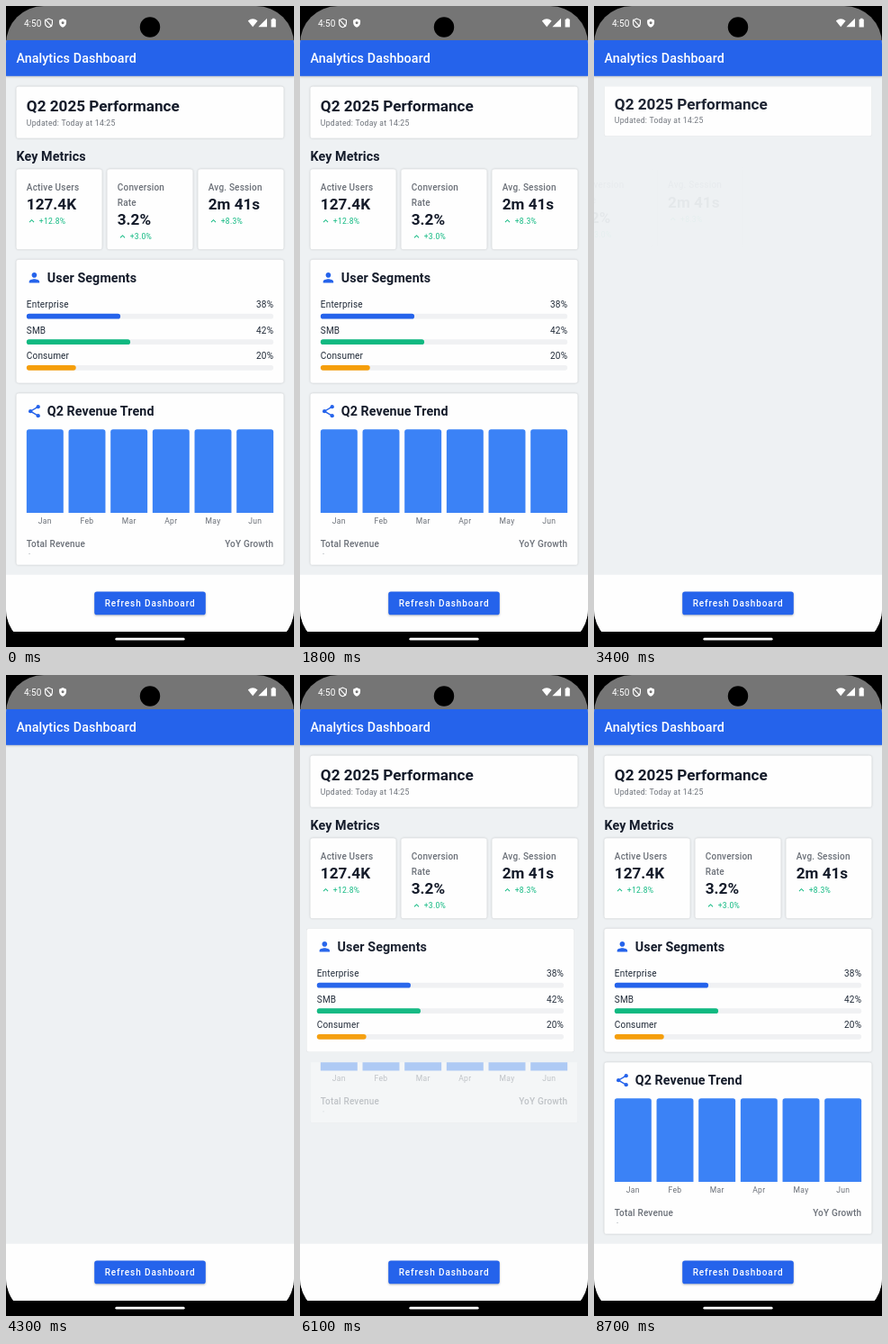
Write an HTML page that moves like this. It is 320 px wide and 712 px high and loops after 8.8 s.

```html
<!DOCTYPE html>
<html lang="en">
<head>
<meta charset="utf-8">
<title>Analytics Dashboard</title>
<style>
  html, body { margin: 0; width: 100%; height: 100%; overflow: hidden; background: #000; }
  svg { display: block; width: 320px; height: 712px; }
  text { font-family: Roboto, sans-serif; white-space: pre; }
  .card { fill: #fefefe; filter: drop-shadow(0 .8px .8px rgba(0, 0, 0, .2)); }
</style>
</head>
<body>
<svg id="stage" viewBox="0 0 320 712" xmlns="http://www.w3.org/2000/svg"></svg>
<script>
const LOOP = 8800;
const DP = 5 / 7;
const LEFT = 16 * DP, RIGHT = 320 - LEFT;
const IN_L = 32 * DP, IN_R = 320 - IN_L, IN_W = IN_R - IN_L;
const BLUE = '#2563eb', GREEN = '#10b981', ORANGE = '#f59e0b';
const INK = '#141b2a', GRAY = '#6b7078';

// Type styles: size (sp), weight, letter spacing (sp), colour
const TYPE = {
  h5: [24, 700, 0, INK],
  h6: [20, 700, 0.15, INK],
  bar: [20, 500, 0.15, '#fff'],
  label: [14, 500, 0.25, GRAY],
  body: [14, 400, 0.25, '#1f2937'],
  caption: [12, 400, 0.4, GRAY],
  trend: [12, 400, 0.4, GREEN],
  button: [14, 500, 1.25, '#fff'],
  clock: [14, 400, 0, '#fff']
};

const text = (type, x, y, str, anchor = 'start') => {
  const [size, weight, spacing, fill] = TYPE[type];
  return `<text x="${x}" y="${y}" text-anchor="${anchor}" fill="${fill}" font-weight="${weight}"
    font-size="${size * DP}" letter-spacing="${spacing * DP}">${str}</text>`;
};
const rect = (x, y, w, h, r, fill, extra = '') =>
  `<rect x="${x}" y="${y}" width="${w}" height="${h}" rx="${r}" fill="${fill}" ${extra}/>`;
const card = (x, y, w, h) => rect(x, y, w, h, 4 * DP, '#fefefe', 'class="card"');
const icon = (x, y, size, body, color) =>
  `<g transform="translate(${x} ${y}) scale(${size * DP / 24})" fill="${color}">${body}</g>`;

const CHEVRON = '<path d="M7.41 15.41 12 10.83l4.59 4.58L18 14l-6-6-6 6z"/>';
const PERSON = '<path d="M12 12c2.21 0 4-1.79 4-4s-1.79-4-4-4-4 1.79-4 4 1.79 4 4 4zm0 2c-2.67 0-8 1.34-8 4v2h16v-2c0-2.66-5.33-4-8-4z"/>';
const SHARE = `<path d="M18 5 6 12l12 7" fill="none" stroke="${BLUE}" stroke-width="2"/>
  <circle cx="18" cy="5" r="3"/><circle cx="6" cy="12" r="3"/><circle cx="18" cy="19" r="3"/>`;
const SHIELD = 'M12 1 3 5v6c0 5.55 3.84 10.74 9 12 5.16-1.26 9-6.45 9-12V5z';

function metric(i, label, value, change) {
  const w = (RIGHT - LEFT - 16 * DP) / 3;
  const x = LEFT + i * (w + 8 * DP), tx = x + LEFT;
  const drop = (label.length - 1) * 17.14;
  return card(x, 181.3, w, 89)
    + label.map((s, k) => text('label', tx, 204.7 + k * 17.14, s)).join('')
    + text('h5', tx, 226 + drop, value)
    + icon(tx, 233.2 + drop, 16, CHEVRON, GREEN)
    + text('trend', tx + 13.9, 242 + drop, change);
}

function segment(i, name, percent, color) {
  const y = 28.57 * i;
  return text('body', IN_L, 335 + y, name)
    + text('body', IN_R, 335 + y, percent + '%', 'end')
    + rect(IN_L, 341.8 + y, IN_W, 5.7, 2.85, '#f0f1f3')
    + rect(IN_L, 341.8 + y, IN_W * percent / 100, 5.7, 2.85, color);
}

function month(i, name) {
  const gap = 8 * DP, w = (IN_W - 5 * gap) / 6, x = IN_L + i * (w + gap), r = 4 * DP;
  return `<path fill="#3b82f6" d="M${x} 563V${470.3 + r}q0-${r} ${r}-${r}h${w - 2 * r}q${r} 0 ${r} ${r}V563z"/>`
    + text('caption', x + w / 2, 575, name, 'middle');
}

// Each section has a box, when it leaves and returns, and whether it folds or slides.
const sections = [
  { id: 'head', top: 89.5, h: 57.3, out: 3385, back: 5415, fold: true,
    body: card(LEFT, 89.5, RIGHT - LEFT, 57.3)
      + text('h5', IN_L, 117, 'Q2 2025 Performance')
      + text('caption', IN_L, 132.6, 'Updated: Today at 14:25') },
  { id: 'metrics', top: 158, h: 112.3, out: 3150, back: 5622,
    body: text('h6', LEFT, 172, 'Key Metrics')
      + metric(0, ['Active Users'], '127.4K', '+12.8%')
      + metric(1, ['Conversion', 'Rate'], '3.2%', '+3.0%')
      + metric(2, ['Avg. Session'], '2m 41s', '+8.3%') },
  { id: 'segments', top: 281.7, h: 137, out: 2958, back: 5828,
    body: card(LEFT, 281.7, RIGHT - LEFT, 137)
      + icon(IN_L, 293.2, 24, PERSON, BLUE)
      + text('h6', 45.7, 306.8, 'User Segments')
      + segment(0, 'Enterprise', 38, BLUE)
      + segment(1, 'SMB', 42, GREEN)
      + segment(2, 'Consumer', 20, ORANGE) },
  { id: 'chart', top: 430.2, h: 190.6, out: 2761, back: 6039, fold: true,
    body: card(LEFT, 430.2, RIGHT - LEFT, 190.6)
      + icon(IN_L, 441.6, 24, SHARE, BLUE)
      + text('h6', 45.7, 455.3, 'Q2 Revenue Trend')
      + ['Jan', 'Feb', 'Mar', 'Apr', 'May', 'Jun'].map((m, i) => month(i, m)).join('')
      + text('label', IN_L, 600.8, 'Total Revenue')
      + text('label', IN_R, 600.8, 'YoY Growth', 'end')
      + rect(25.4, 608, 1.3, 0.8, 0, '#a5a9b0') }
];

const statusBar = rect(0, 0, 320, 38, 0, '#757575')
  + text('clock', 20, 22.6, '4:50')
  + `<g fill="none" stroke="#fff" stroke-width="2.6" transform="translate(42.2 13.6) scale(.44)">
       <path d="${SHIELD}"/><path d="M3 3 20 21"/></g>
     <g transform="translate(57.8 13.6) scale(.44)"><path d="${SHIELD}" fill="#fff"/>
       <circle cx="12" cy="11.5" r="3.4" fill="#757575"/></g>
     <path fill="#fff" d="M268.8 16.4q5.4-4.2 10.8 0L274.2 23.2z"/>
     <path fill="#fff" d="M290 13.8V23.2H280.4z"/>
     <path fill="#fff" d="M296 13.8h2.6v1h1.2v8.6h-5.2V14.8H296z"/>
     <circle cx="160" cy="23.5" r="11.2"/>`;

document.getElementById('stage').innerHTML = `
  <defs>
    <clipPath id="screen"><rect width="320" height="712" rx="42"/></clipPath>
    <clipPath id="btnClip"><rect x="98.2" y="650.6" width="123.6" height="25.7" rx="2.86"/></clipPath>
    <radialGradient id="glow"><stop offset="0" stop-color="#fff"/>
      <stop offset=".5" stop-color="#fff" stop-opacity=".8"/>
      <stop offset="1" stop-color="#fff" stop-opacity="0"/></radialGradient>
    ${sections.map(s => `<clipPath id="${s.id}Clip"><rect x="${LEFT}" y="${s.top}"
      width="${RIGHT - LEFT}" height="${s.h}"/></clipPath>`).join('')}
  </defs>
  <rect width="320" height="712"/>
  <g clip-path="url(#screen)">
    ${rect(0, 38, 320, 657, 0, '#eef1f3')}
    ${sections.map(s => `<g id="${s.id}"><g>${s.body}</g></g>`).join('')}
    ${rect(0, 631.8, 320, 63.2, 0, '#fefefe')}
    ${rect(0, 38, 320, 39.8, 0, BLUE, 'style="filter:drop-shadow(0 1px 1.2px rgba(0,0,0,.2))"')}
    ${text('bar', LEFT, 62.7, 'Analytics Dashboard')}
    ${statusBar}
    ${rect(98.2, 650.6, 123.6, 25.7, 2.86, BLUE, 'id="btn"')}
    <g clip-path="url(#btnClip)"><circle id="ripple" cx="160" cy="663.5" r="1" fill="url(#glow)"/></g>
    ${text('button', 109.7, 667, 'Refresh Dashboard')}
    ${rect(0, 695, 320, 17, 0, '#000')}
    ${rect(121.4, 701.8, 77.2, 2.8, 1.4, '#fff')}
  </g>`;

const get = id => document.getElementById(id);
for (const s of sections) {
  s.el = get(s.id);
  s.inner = s.el.firstElementChild;
  s.clip = get(s.id + 'Clip').firstElementChild;
}
const btn = get('btn'), ripple = get('ripple');
const ramp = (t, a, b) => Math.min(1, Math.max(0, (t - a) / (b - a)));

// Critically damped spring, stiffness 400: distance left after ms
const spring = ms => {
  const s = Math.max(0, ms) / 50;
  const left = (1 + s) * Math.exp(-s);
  return left < 0.01 ? 0 : left;
};
const shown = (s, t) =>
  t < s.out ? 1 : t < s.back ? spring(t - s.out) : 1 - spring(t - s.back);

function place(s, p, lift) {
  const moving = p < 1;
  s.el.style.display = p > 0 ? '' : 'none';
  s.el.setAttribute('opacity', p);
  const hidden = s.h * (1 - p);
  const dx = s.fold ? 0 : -(RIGHT - LEFT) / 2 * (1 - p);
  s.el.setAttribute('transform', `translate(${dx} ${-lift})`);
  s.inner.setAttribute('transform', `translate(0 ${s.fold ? -hidden : 0})`);
  s.clip.setAttribute('height', s.fold ? s.h - hidden : s.h);
  if (moving) s.el.setAttribute('clip-path', `url(#${s.id}Clip)`);
  else s.el.removeAttribute('clip-path');
}

function draw(t) {
  const headShown = shown(sections[0], t);
  sections.forEach((s, i) => {
    const lift = i ? sections[0].h * (1 - headShown) : 0;
    place(s, shown(s, t), lift);
  });

  const press = ramp(t, 2620, 2740) - ramp(t, 2850, 3000);
  const drop = 1 + press * 1.2;
  btn.style.filter = `drop-shadow(0 ${drop}px ${drop}px rgba(0,0,0,.25))`;
  ripple.setAttribute('r', 12 + 58 * ramp(t, 2620, 2900));
  ripple.setAttribute('opacity', 0.22 * (ramp(t, 2620, 2690) - ramp(t, 2820, 3050)));
}

const start = performance.now();
function tick() {
  draw((performance.now() - start) % LOOP);
  requestAnimationFrame(tick);
}
tick();
</script>
</body>
</html>
```
